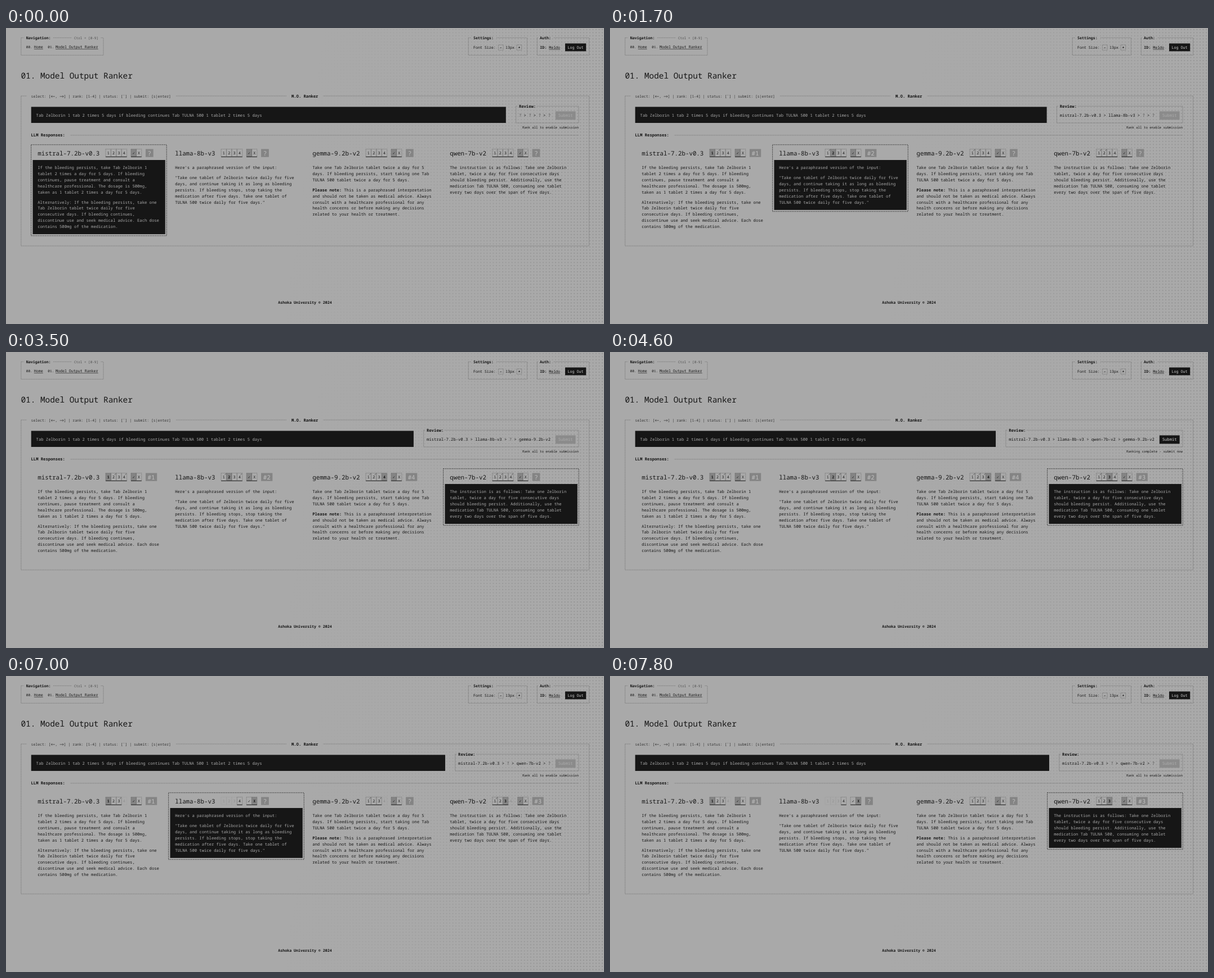
Animation of 1062x527 px, one loop 8000 ms. Source, as an HTML page:

```html
<!DOCTYPE html>
<html lang="en">
<head>
<meta charset="utf-8">
<title>Model Output Ranker</title>
<style>
  html, body { margin: 0; width: 100%; height: 100%; overflow: hidden; background: #a9a9a9; }
  svg { display: block; width: 1062px; height: 527px; }
  text {
    font-family: "Noto Sans Mono", "DejaVu Sans Mono", monospace;
    white-space: pre;
    text-rendering: geometricPrecision;
  }
  .b { font-weight: 600; }
  .mid { text-anchor: middle; }
  .end { text-anchor: end; }
  .dot { fill: none; stroke: #555; stroke-width: .6; stroke-dasharray: .8 .7; }
  .dash { fill: none; stroke: #111; stroke-width: .75; stroke-dasharray: 1.8 1.3; }
  .rule { fill: none; stroke: #1a1a1a; stroke-width: .6; }
</style>
</head>
<body>
<svg viewBox="0 0 1062 527">
  <defs>
    <linearGradient id="fade" gradientUnits="userSpaceOnUse" x1="530" y1="230" x2="1050" y2="300">
      <stop stop-color="#fff" stop-opacity="0"/><stop offset="1" stop-color="#fff" stop-opacity=".85"/>
    </linearGradient>
    <pattern id="dots" width="5.53" height="5.53" patternUnits="userSpaceOnUse">
      <circle cx="2.765" cy="2.765" r=".75" fill="#6c6c6c"/>
    </pattern>
    <mask id="m"><rect width="1062" height="527" fill="url(#fade)"/></mask>
  </defs>
  <rect width="1062" height="527" fill="#a9a9a9"/>
  <rect width="1062" height="527" fill="url(#dots)" mask="url(#m)"/>
  <g id="page"></g>
  <g id="live"></g>
</svg>
<script>
const INK = '#161616', PAPER = '#a9a9a9', GREY = '#848484', SOFT = '#505050';
const BODY = 7.19, SMALL = 6.64, HEAD = 10.8, ADV = BODY * .6, LEAD = BODY * 1.5;

const models = [
  { name: 'mistral-7.2b-v0.3', text: [
    ['If the bleeding persists, take Tab Zelborin 1', 'tablet 2 times a day for 5 days. If bleeding',
     'continues, pause treatment and consult a', 'healthcare professional. The dosage is 500mg,',
     'taken as 1 tablet 2 times a day for 5 days.'],
    ['Alternatively: If the bleeding persists, take one', 'Tab Zelborin tablet twice daily for five',
     'consecutive days. If bleeding continues,', 'discontinue use and seek medical advice. Each dose',
     'contains 500mg of the medication.']] },
  { name: 'llama-8b-v3', text: [
    ["Here's a paraphrased version of the input:"],
    ['"Take one tablet of Zelborin twice daily for five', 'days, and continue taking it as long as bleeding',
     'persists. If bleeding stops, stop taking the', 'medication after five days. Take one tablet of',
     'TULNA 500 twice daily for five days."']] },
  { name: 'gemma-9.2b-v2', text: [
    ['Take one Tab Zelborin tablet twice a day for 5', 'days. If bleeding persists, start taking one Tab',
     'TULNA 500 tablet twice a day for 5 days.'],
    ['<tspan class="b">Please note:</tspan> This is a paraphrased interpretation',
     'and should not be taken as medical advice. Always', 'consult with a healthcare professional for any',
     'health concerns or before making any decisions', 'related to your health or treatment.']] },
  { name: 'qwen-7b-v2', text: [
    ['The instruction is as follows: Take one Zelborin', 'tablet, twice a day for five consecutive days',
     'should bleeding persist. Additionally, use the', 'medication Tab TULNA 500, consuming one tablet',
     'every two days over the span of five days.']] }
];

// start time, selected column, rank per column, rejected column
const steps = [
  [0, 0, [0, 0, 0, 0], -1],
  [500, 0, [1, 0, 0, 0], -1],
  [900, 1, [1, 0, 0, 0], -1],
  [1700, 1, [1, 2, 0, 0], -1],
  [2200, 2, [1, 2, 0, 0], -1],
  [3200, 2, [1, 2, 4, 0], -1],
  [3500, 3, [1, 2, 4, 0], -1],
  [4600, 3, [1, 2, 4, 3], -1],
  [5900, 2, [1, 2, 4, 3], -1],
  [6200, 1, [1, 2, 4, 3], -1],
  [7000, 1, [1, 0, 0, 3], 1],
  [7500, 2, [1, 0, 0, 3], 1],
  [7800, 3, [1, 0, 0, 3], 1]
];

const text = (x, y, s, size = BODY, cls = '', fill = INK) =>
  `<text x="${x}" y="${y}" font-size="${size}" class="${cls}" fill="${fill}">${s}</text>`;
const box = (x, y, w, h, fill = INK) => `<rect x="${x}" y="${y}" width="${w}" height="${h}" fill="${fill}"/>`;
const path = (d, cls = 'dot') => `<path d="${d}" class="${cls}"/>`;
const frame = (x, y, w, h, cls = 'dot') => path(`M${x} ${y}h${w}v${h}h${-w}z`, cls);
const link = (x, y, s) => text(x, y, s, SMALL) + path(`M${x} ${y + 1.3}h${s.length * SMALL * .6}`, 'rule');

// bordered group whose top edge is broken at each [from, to] gap
function fieldset(x, y, w, h, ...gaps) {
  let d = `M${x} ${y}v${h}h${w}v${-h}M${x} ${y}`;
  for (const [a, b] of gaps) d += `H${a}M${b} ${y}`;
  return path(d + `H${x + w}`);
}

function drawPage() {
  return [
    fieldset(26.8, 17.4, 146.2, 31, [31.5, 84], [117, 168.5]),
    text(35.8, 20, 'Navigation:', SMALL, 'b'),
    text(121, 19.8, 'Ctrl + [0-9]', 5.97, '', SOFT),
    text(35.8, 36, '00.', 5.97), link(49.8, 36.3, 'Home'),
    text(74.3, 36, '01.', 5.97), link(88, 36.3, 'Model Output Ranker'),

    fieldset(821.2, 17.4, 104.2, 31, [826, 871]),
    text(830, 20, 'Settings:', SMALL, 'b'),
    text(830, 37, 'Font Size:', SMALL),
    frame(874.4, 30, 8.8, 9.4), text(878.8, 37, '-', SMALL, 'mid b'),
    text(887, 37, '13px', SMALL),
    frame(907, 30, 8.8, 9.4), text(911.4, 37, '+', SMALL, 'mid b'),

    fieldset(943.3, 17.4, 92.2, 31, [945, 972.5]),
    text(948, 20, 'Auth:', SMALL, 'b'),
    text(948.3, 37, 'ID:', SMALL, 'b'), link(964.2, 37, 'Meldo'),
    box(993, 27.5, 37.2, 13.9), text(997.6, 37, 'Log Out', SMALL, '', '#d0d0d0'),

    text(26.4, 89.8, '01. Model Output Ranker', 14.38),

    fieldset(26.8, 121, 1008.7, 267, [36.5, 302], [498, 563.5]),
    text(44.5, 123.6, 'select: [  ,   ] | rank: [1-4] | status: [`] | submit: [s|enter]', 6.48, '', '#333'),
    path('M80.3 121.9h6.6m-5-1.7l-1.7 1.7l1.7 1.7M95.6 121.9h6.6m-1.7-1.7l1.7 1.7l-1.7 1.7', 'rule'),
    text(530.7, 123.6, 'M.O. Ranker', BODY, 'b mid'),

    text(44.5, 193.4, 'LLM Responses:', BODY, 'b'),
    path('M114.5 190.9H1017'),
    text(531, 490.6, 'Ashoka University © 2024', SMALL, 'b mid')
  ].join('');
}

function drawReview(ranks) {
  const slots = [1, 2, 3, 4].map(r => ranks.indexOf(r));
  const names = slots.map(i => i < 0 ? '?' : models[i].name);
  const x = 967 - names.join(' > ').length * ADV, left = x - 5.3;
  const line = names.map(n => n === '?' ? `<tspan fill="${SOFT}">?</tspan>` : n).join(' &gt; ');
  const done = !ranks.includes(0);
  return box(44.7, 140.4, left - 17.8 - 44.7, 28.6) +
    text(53.6, 157.6, 'Tab Zelborin 1 tab 2 times 5 days if bleeding continues Tab TULNA 500 1 tablet 2 times 5 days', BODY, '', PAPER) +
    fieldset(left, 139.2, 1017 - left, 29.8, [left + 3, left + 37]) +
    text(x, 141.8, 'Review:', BODY, 'b') +
    text(x, 158, line) +
    box(975.8, 148.4, 35.8, 15, done ? INK : '#8b8b8b') +
    text(980.7, 158.2, 'Submit', BODY, '', done ? '#d0d0d0' : '#acacac') +
    text(1017, 179.2, done ? 'Ranking complete - submit now' : 'Rank all to enable submission', 5.76, 'end');
}

function drawCell(x, label, { on, off, taken } = {}) {
  const w = 9.4;
  return `<g opacity="${off ? .18 : 1}">` +
    (on ? box(x, 215.6, w, 13.6, GREY) : '') +
    frame(x, 215.6, w, 13.6) +
    (off ? '' : box(x, 228.9, w, .9)) +
    text(x + w / 2, 225, label, SMALL, on ? 'mid b' : 'mid') +
    (taken ? path(`M${x + w - .8} 216.4l-2 2.2`, 'rule') : '') + '</g>';
}

function drawModel(i, selected, ranks, rejected) {
  const { name, text: paras } = models[i];
  const left = 44.6 + i * 244, x = left + 11.6, tools = x + name.length * HEAD * .6 + 10.6;
  const lines = paras.flat().length;
  const h = lines * LEAD + (paras.length - 1) * BODY + 17;
  const active = i === selected, out = i === rejected, rank = ranks[i];
  let s = '';
  if (active) s += frame(left, 207.8, 240.6, h + 30, 'dash') + box(left + 2.9, 235, 235.2, h);

  s += text(x, 226.6, name, HEAD);
  for (let r = 1; r <= 4; r++) {
    const off = rejected >= 0 && out === (r < 4);
    s += drawCell(tools + (r - 1) * 9.4, r, { on: rank === r, off, taken: !off && rank !== r && ranks.includes(r) });
  }
  s += drawCell(tools + 45, '✓', { on: !out }) + drawCell(tools + 54.4, 'X', { on: out });
  const badge = rank ? '#' + rank : '?';
  s += box(tools + 71, 215.5, badge.length * 6.5 + 7.2, 14.2, GREY) +
    text(tools + 74.6, 226.5, badge, HEAD, '', '#c0c0c0');

  let y = 251.4;
  for (const p of paras) {
    for (const line of p) {
      s += text(x, y, line, BODY, '', active ? PAPER : INK);
      y += LEAD;
    }
    y += BODY;
  }
  return s;
}

const live = document.getElementById('live');
document.getElementById('page').innerHTML = drawPage();
let shown = null;

function tick() {
  const t = performance.now() % 8000;
  const step = steps.findLast(s => s[0] <= t);
  if (step !== shown) {
    shown = step;
    const [, selected, ranks, rejected] = step;
    live.innerHTML = drawReview(ranks) + models.map((_, i) => drawModel(i, selected, ranks, rejected)).join('');
  }
  requestAnimationFrame(tick);
}
tick();
</script>
</body>
</html>
```
